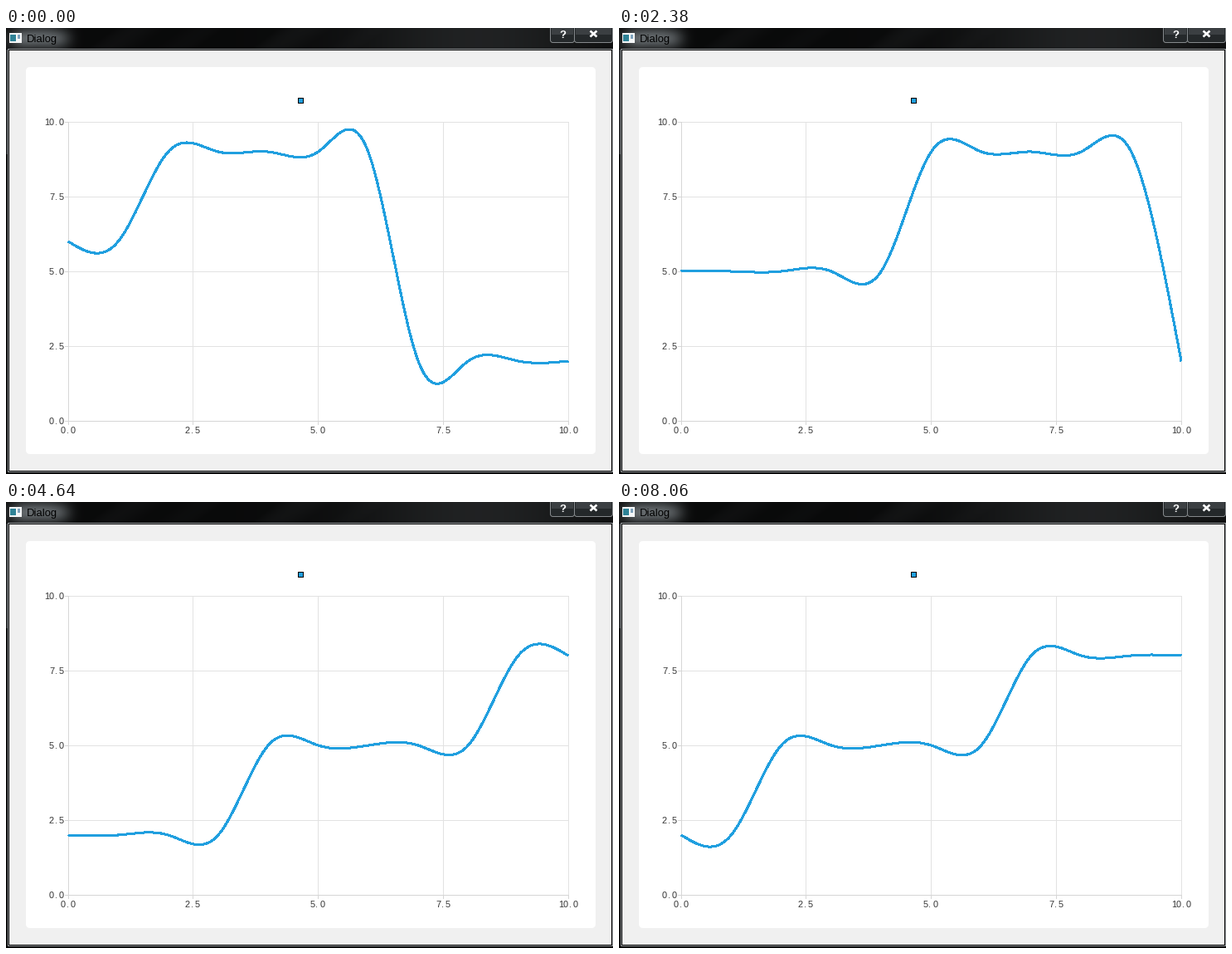
Write a matplotlib script that moves like this. It is 732 px wide and 537 px high and loops after 8140 ms.

```python
import numpy as np
import matplotlib.pyplot as plt
from matplotlib.animation import FuncAnimation
from matplotlib.patches import FancyBboxPatch, Rectangle

W, H, DPI = 732, 537, 64
LOOP, TICK = 8140, 20
PX = 72 / DPI
LEFT, RIGHT, TOP, BOTTOM = 75, 678, 113, 473
BLUE = "#209fdf"

# The signal holds each level for five samples; the chart shows eleven of them.
LEVELS = [9, 2, 5, 9, 2, 5, 8, 2, 5, 8]
SIGNAL = np.concatenate([[6, 6], np.repeat(LEVELS, 5)]).astype(float)
WINDOW = 11

# Moments (ms) at which the window moves on by one sample.
SHIFTS = [
    210, 360, 600, 820, 970, 1220, 1370, 1600, 1840, 1990,
    2230, 2380, 2610, 2850, 3000, 3240, 3390, 3630, 3780, 4020,
    4250, 4410, 4640, 4880, 5030, 5260, 5420, 5650, 5810, 6040,
    6280, 6430, 6660, 6820, 7050, 7280, 7440, 7670, 7830, 8060,
]

fig = plt.figure(figsize=(W / DPI, H / DPI), dpi=DPI, facecolor="black")
ax = fig.add_axes([0, 0, 1, 1])


def rect(x0, y0, x1, y1, color, **kw):
    ax.add_patch(Rectangle((x0, y0), x1 - x0, y1 - y0, fc=color, lw=0, **kw))


def rounded(x0, y0, x1, y1, r, **kw):
    style = f"round,pad=0,rounding_size={r}"
    ax.add_patch(FancyBboxPatch((x0, y0), x1 - x0, y1 - y0, boxstyle=style, **kw))


def label(x, y, s):
    """Write s in fixed cells of six pixels, starting at x on baseline y."""
    for i, ch in enumerate(s):
        ax.text(x + 6 * i + (2 if ch == "." else 3), y, ch, ha="center",
                va="baseline", family="Liberation Sans", size=11 * PX,
                color="#353535")


def draw_title_bar():
    y, x = np.mgrid[0:25, 0:W] + 0.5
    u = x + 1.4 * y
    shade = 10 + 24 * np.exp(-((x - 570) / 150) ** 2)
    shade += 9 * np.clip(np.sin(u / 21) * np.sin(u / 67), 0, 1) * (x < 460)
    glow = np.exp(-((x - 40) / 36) ** 4 - ((y - 12.5) / 13) ** 2)
    tint = np.array([0.95, 1.0, 1.03])
    rgb = (shade + 92 * glow)[..., None] * tint / 255
    ax.imshow(np.clip(rgb, 0, 1), extent=(0, W, 25, 0),
              interpolation="nearest", aspect="auto")

    rect(4, 6, 19, 18, "#f4f6f7")
    rect(5, 8, 12, 16, "#2f8296")
    rect(14, 8, 17, 13, "#7fa3bd")
    ax.text(25, 16.5, "Dialog", family="Liberation Sans", size=13 * PX,
            va="baseline", color="black")

    for x0, x1 in ((656, 685), (685, 731)):
        rounded(x0 + 0.5, -6.5, x1 + 0.5, 17.5, 3, fc="#24282a", ec="#85898c",
                lw=PX)
        rect(x0 + 2, 0, x1 - 1, 8, "#3b3f42")
    ax.text(671, 12, "?", family="Liberation Sans", weight="bold",
            size=13 * PX, ha="center", va="baseline", color="white")
    for a, b in ((3.5, 10.5), (10.5, 3.5)):
        ax.plot([704.5, 712.5], [a, b], color="white", lw=2.6 * PX,
                solid_capstyle="butt")


def draw_window():
    rect(0, 26, 2, 152, "#2c2e30")
    rect(2, 25, W, 535, "#9a9ea1")
    rect(3, 26, 731, 534, "black")
    rect(4, 27, 730, 533, "#f0f0f0")
    rounded(24, 47, 711, 513, 5, fc="white", lw=0)
    rect(352, 84, 359, 91, "black")
    rect(353, 85, 358, 90, BLUE)


def draw_axes():
    grid, axis = "#e2e2e2", "#d6d6d6"
    xs = [75, 225, 376, 527, 678]
    ys = [473, 383, 293, 203, 113]
    for x, y in zip(xs, ys):
        rect(x, TOP, x + 1, BOTTOM + 1, grid)
        rect(LEFT, y, RIGHT + 1, y + 1, grid)
    rect(LEFT, TOP, LEFT + 1, BOTTOM + 1, axis)
    rect(LEFT, BOTTOM, RIGHT + 1, BOTTOM + 1, axis)
    for i, (x, y) in enumerate(zip(xs, ys)):
        s = f"{2.5 * i:.1f}"
        rect(x, BOTTOM, x + 1, BOTTOM + 5, axis)
        rect(LEFT - 4, y, LEFT, y + 1, axis)
        label(x - 3 * len(s), 488, s)
        label(70 - 6 * len(s), y + 4, s)


def natural_spline(v, t):
    """Natural cubic spline through v at 0, 1, 2, ... evaluated at t."""
    n = len(v)
    a = np.eye(n)
    d = np.zeros(n)
    for i in range(1, n - 1):
        a[i, i - 1:i + 2] = 1, 4, 1
        d[i] = 6 * (v[i - 1] - 2 * v[i] + v[i + 1])
    m = np.linalg.solve(a, d)
    i = np.minimum(t.astype(int), n - 2)
    q = t - i
    p = 1 - q
    return (p * v[i] + q * v[i + 1]
            + ((p**3 - p) * m[i] + (q**3 - q) * m[i + 1]) / 6)


draw_title_bar()
draw_window()
draw_axes()
ax.set_xlim(0, W)
ax.set_ylim(H, 0)
ax.axis("off")

T = np.linspace(0, WINDOW - 1, 401)
curve, = ax.plot(LEFT + T * (RIGHT - LEFT) / 10, T, color=BLUE, lw=2 * PX,
                 antialiased=False, solid_capstyle="butt")


def update(i):
    shift = np.searchsorted(SHIFTS, i * TICK + TICK / 2, side="right")
    v = natural_spline(SIGNAL[shift:shift + WINDOW], T)
    curve.set_ydata(BOTTOM - v * (BOTTOM - TOP) / 10)
    return curve,


anim = FuncAnimation(fig, update, frames=LOOP // TICK, interval=TICK,
                     repeat=True, repeat_delay=0)
plt.show()
```
